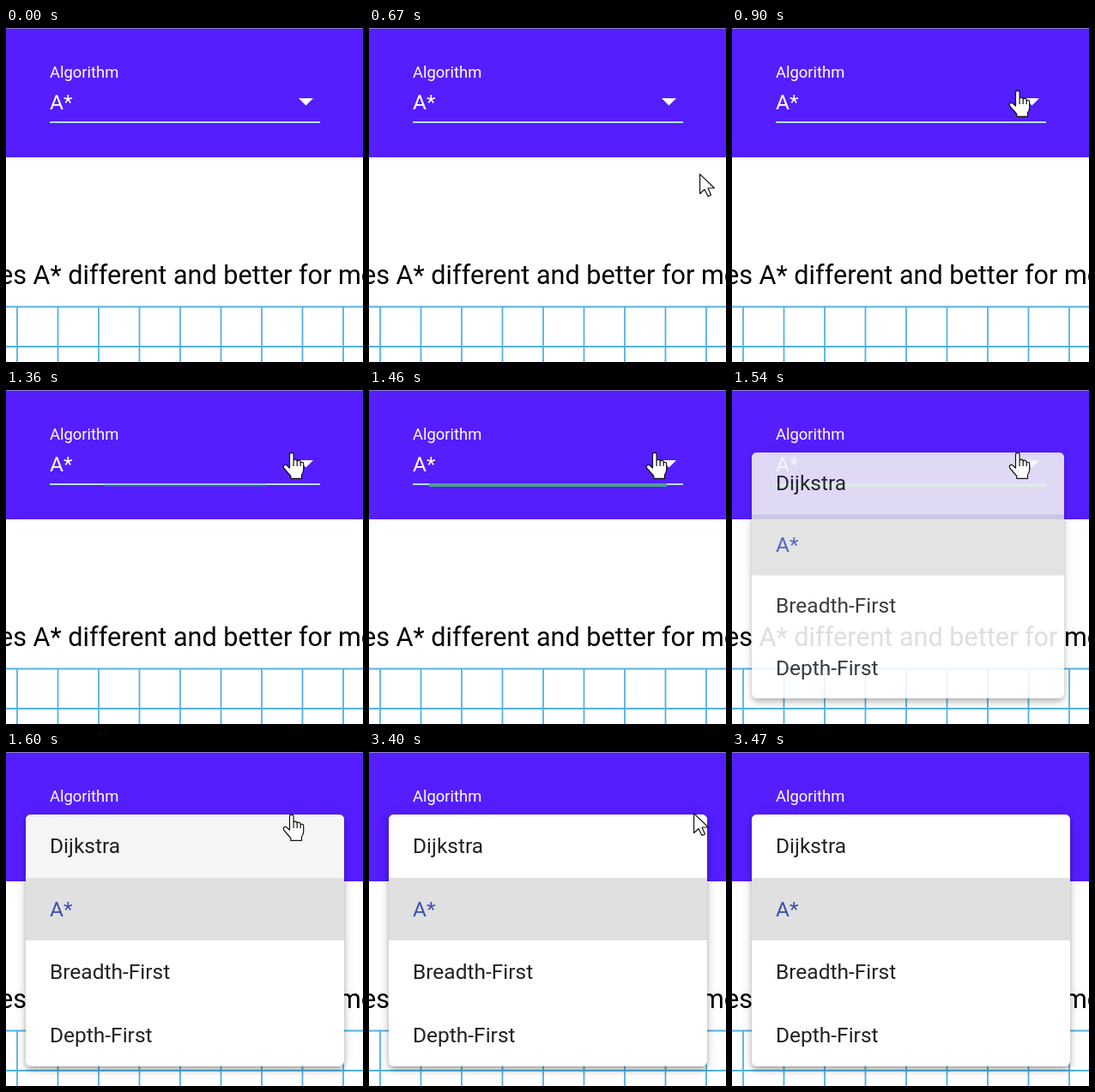
Write an HTML page that moves like this. It is 416 px wide and 390 px high and loops after 4080 ms.

```html
<!DOCTYPE html>
<html lang="en">
<head>
<meta charset="utf-8">
<style>
  html, body { margin: 0; width: 100%; height: 100%; overflow: hidden; background: #fff; }
  body, text { font-family: Roboto, Arial, sans-serif; }
  svg { position: absolute; left: 0; top: 0; }
  #menu {
    position: absolute; left: 23px; top: 73px; height: 294px;
    overflow: hidden; border-radius: 6px; background: #fff;
    font-size: 24.5px; line-height: 73.5px; color: rgba(0, 0, 0, .87);
    transform-origin: 0 0;
    box-shadow: 0 3px 6px -1.5px rgba(0, 0, 0, .2), 0 6px 7.5px rgba(0, 0, 0, .14),
      0 1.5px 15px rgba(0, 0, 0, .12);
  }
  #menu div { height: 73.5px; padding-left: 28px; }
  #menu .chosen { background: #e0e0e0; color: #3f51b5; }
</style>
</head>
<body>
<svg width="416" height="390">
  <path fill="#541eff" d="M0 0H416V151H0z"/>
  <path fill="#8a80c4" d="M0 0H416V1H0z"/>
  <g fill="#fff">
    <text x="51" y="58" font-size="18.4">Algorithm</text>
    <text x="51" y="95.3" font-size="24.5">A*</text>
    <path d="M341 82H358L349.5 90.5z"/>
  </g>
  <path fill="#b4e2f8" d="M51 109H366V111H51z"/>
  <path id="ripple" fill="#4ca08c" d="M-157.5 109H157.5V113H-157.5z"/>
  <text x="-8" y="299" font-size="30.6">es A* different and better for more</text>
  <path id="grid" fill="none" stroke="#52b3e2" stroke-width="1.8"/>
</svg>
<div id="menu">
  <div id="first">Dijkstra</div>
  <div class="chosen">A*</div>
  <div>Breadth-First</div>
  <div>Depth-First</div>
</div>
<svg width="416" height="390">
  <g fill="#fff" stroke="#111" stroke-width="1.2" stroke-linejoin="round">
    <path id="arrow" d="M.6 .6V23.5L6 18.5L10 26.4L13.5 25L10 17H17.4z"/>
    <path id="hand" d="M8.5 19V3.5a2.3 2.3 0 0 1 4.6 0V11a2 2 0 0 1 4.1 .3V12a2 2 0 0 1 4 .5V13.5
      a1.8 1.8 0 0 1 3.5 .7V21Q24.7 24 22.5 27V31.3H9.8V28.5L2 19.5Q.3 16.5 2.5 15.6
      Q4.5 15 6.2 17zM13.1 11V17M17.2 12V17M21.2 13V17"/>
  </g>
</svg>
<script>
const LOOP = 4080;
const el = id => document.getElementById(id);
const [ripple, menu, first, arrow, hand] = ['ripple', 'menu', 'first', 'arrow', 'hand'].map(el);

let lines = 'M0 325.5H416M0 372H416';
for (let x = 13; x < 416; x += 47.5) lines += `M${x} 325V390`;
el('grid').setAttribute('d', lines);

function place(node, pos) {
  node.style.display = pos ? '' : 'none';
  if (pos) node.setAttribute('transform', `translate(${pos})`);
}

// Pointer position while it glides in, in a few eased jumps
function entry(t) {
  const p = Math.min(3, Math.floor((t - 670) / 76.6)) / 3;
  const ease = 1 - (1 - p) ** 1.7;
  return [385 - 63 * ease, 170 - 98 * ease];
}

function draw(t) {
  const entered = t >= 670 && t < 3400;
  const pos = entered && entry(t);
  const overField = entered && pos[1] < 112 && pos[0] < 350;
  place(hand, overField && pos);
  place(arrow, entered ? !overField && pos : t >= 3400 && t < 3470 && [378, 71]);

  const grow = t < 1460 ? .6 : t < 1540 ? .88 : 1;
  ripple.setAttribute('transform', `translate(208.5) scale(${grow} 1)`);
  ripple.style.opacity = t < 1360 ? 0 : t < 1460 ? .3 : 1;

  const open = t >= 1600;
  menu.style.display = t < 1540 ? 'none' : '';
  menu.style.width = open ? '371px' : '364px';
  menu.style.transform = open ? 'none' : 'scaleY(.976)';
  menu.style.opacity = open ? 1 : .87;
  first.style.background = t < 3400 ? '#f5f5f5' : '#fff';
}

const start = performance.now();
function tick() {
  draw((performance.now() - start) % LOOP);
  requestAnimationFrame(tick);
}
tick();
</script>
</body>
</html>
```
